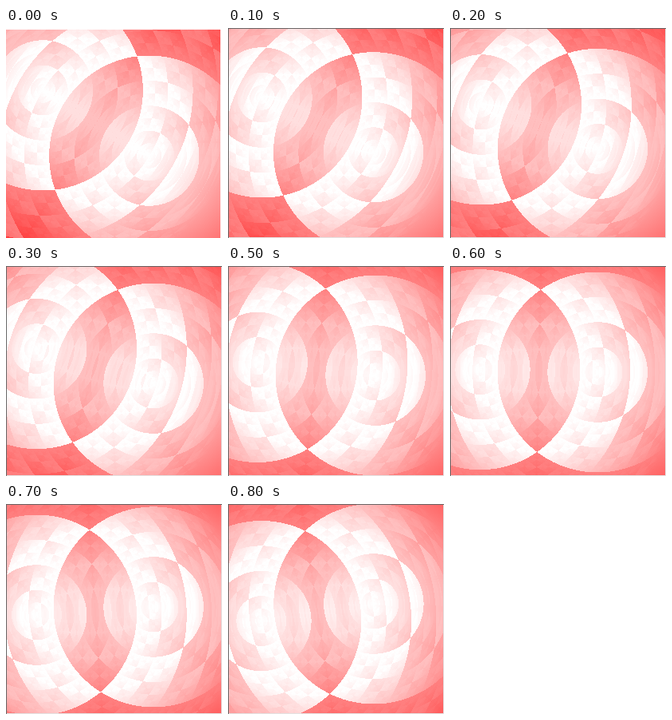
Recreate the animation shown at these times as an HTML page with a canvas. Size 271 by 263 pixels, loop 900 ms.

```html
<!DOCTYPE html>
<html lang="en">
<head>
<meta charset="utf-8">
<title>Interfering gradients</title>
<style>
  html, body { margin: 0; width: 100%; height: 100%; overflow: hidden; background: #fff; }
  canvas { display: block; width: 271px; height: 263px; }
</style>
</head>
<body>
<canvas id="stage" width="271" height="263"></canvas>
<script>
const WIDTH = 271, HEIGHT = 263;
const STEP_MS = 100, STEPS = 9;
const RADIUS = 250;

const ctx = document.getElementById('stage').getContext('2d');
const image = ctx.createImageData(WIDTH, HEIGHT);

// Centres of the two radial gradients: [step, leftX, leftY, rightX, rightY]
const path = [
  [0, 45.8, 77.5, 179.2, 159.5],
  [2, 39, 95.5, 184.8, 150.9],
  [4, 37.1, 110.8, 184.4, 142.2],
  [5, 36.6, 120, 184.6, 136.6],
  [7, 38, 138.5, 184.6, 128.4],
  [8, 41.3, 146, 182.3, 124.5]
];

function centresAt(step) {
  const next = Math.max(1, path.findIndex(key => key[0] >= step));
  const from = path[next - 1], to = path[next];
  const mix = (step - from[0]) / (to[0] - from[0]);
  return from.slice(1).map((value, i) => value + (to[i + 1] - value) * mix);
}

// Gradient level 0..255, clamped outside the radius
function level(dx, dy) {
  return Math.min(255, Math.floor(Math.hypot(dx, dy) * 255 / RADIUS));
}

function drawEdges(step) {
  if (step === 0) {
    ctx.fillStyle = '#fff';
    ctx.fillRect(0, 0, WIDTH, 2);
    ctx.fillRect(WIDTH - 2, 0, 2, HEIGHT);
    return;
  }
  ctx.fillStyle = '#e3e3e3';
  ctx.fillRect(WIDTH - 1, 0, 1, HEIGHT);
  ctx.fillRect(0, HEIGHT - 1, WIDTH, 1);
  ctx.fillStyle = '#696969';
  ctx.fillRect(0, 0, WIDTH, 1);
  ctx.fillRect(0, 0, 1, HEIGHT);
}

function draw(step) {
  const [leftX, leftY, rightX, rightY] = centresAt(step);
  const pixels = image.data;
  let i = 0;
  for (let y = 0; y < HEIGHT; y++) {
    for (let x = 0; x < WIDTH; x++) {
      const shade = 255 - (level(x - leftX, y - leftY) & level(x - rightX, y - rightY));
      pixels[i++] = 255;
      pixels[i++] = shade;
      pixels[i++] = shade;
      pixels[i++] = 255;
    }
  }
  ctx.putImageData(image, 0, 0);
  drawEdges(step);
}

const start = performance.now();
let shown = -1;

function tick() {
  const step = Math.floor((performance.now() - start) / STEP_MS) % STEPS;
  if (step !== shown) draw(shown = step);
  requestAnimationFrame(tick);
}
tick();
</script>
</body>
</html>
```
